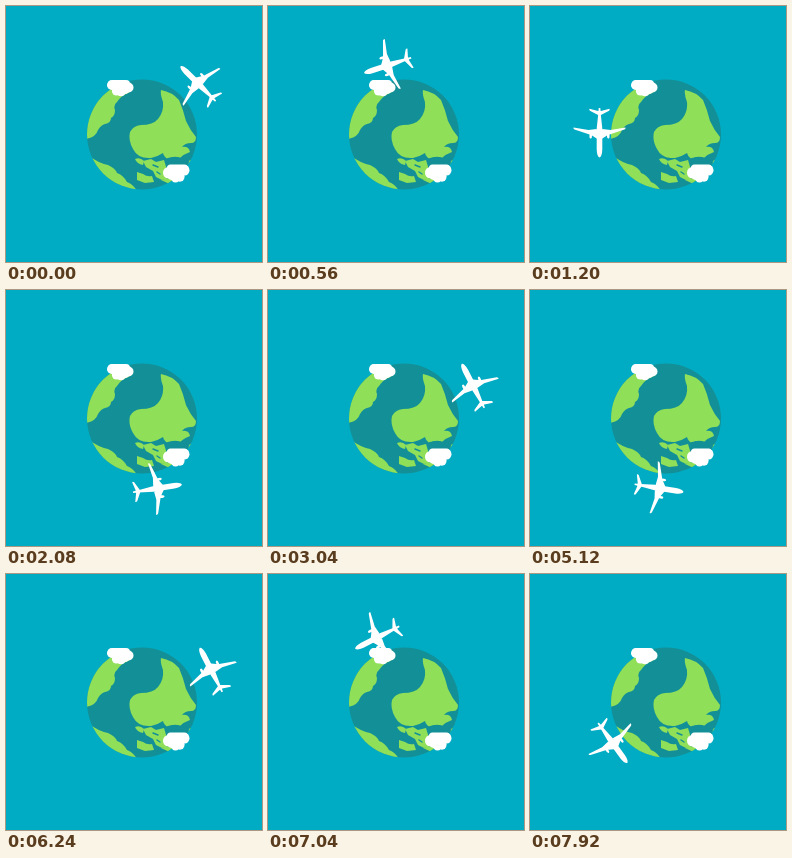
Animation of 256x256 px, one loop 8000 ms. Source, as an HTML page:

```html
<!DOCTYPE html>
<html lang="en">
<head>
<meta charset="utf-8">
<title>Plane around the globe</title>
<style>
  html, body { margin: 0; width: 100%; height: 100%; overflow: hidden; background: #00acc4; }
  svg { display: block; width: 100vw; height: 100vh; }
</style>
</head>
<body>
<svg viewBox="0 0 256 256">
  <defs>
    <clipPath id="disc"><circle cx="136" cy="128.5" r="55"/></clipPath>
    <g id="cloud">
      <rect x="1" y="0" width="22" height="9" rx="4"/>
      <circle cx="4.8" cy="5.2" r="4.8"/>
      <circle cx="21.5" cy="7.5" r="5"/>
      <circle cx="9.5" cy="11" r="4.6"/>
      <circle cx="14" cy="11.5" r="4.8"/>
      <circle cx="18" cy="9.5" r="4.5"/>
    </g>
    <path id="side" d="M0 -6 L2.8 -5 L7.5 -2 Q7.4 -5 8.8 -5 Q10.4 -5 10 -.8 L25 4 Q26.4 4.8 26 6.2 L11 3.6 L2.8 4.6 Z
      M0 18.2 L1.4 18.5 L9.6 22.8 Q10.6 23.8 10 24.8 L1.5 22.6 L0 23 Z"/>
  </defs>
  <rect width="256" height="256" fill="#00acc4"/>
  <g clip-path="url(#disc)">
    <rect x="80" y="72" width="112" height="113" fill="#139097"/>
    <g fill="#8fdf58">
      <path d="M98 78 L127 80 Q126 86 120 88 Q115 90 111 96 Q107 99 109 104 Q109 110 105 112 Q105 117 99 118 Q95 119 92 124 Q90 131 80 133 L78 100 Z"/>
      <path d="M155 84 Q166 86 173 94 Q177 103 180 115 Q184 124 190 131 Q190 137 185 137 Q179 137 176 141 Q183 140 184 146 Q178 148 174 152 Q168 149 162 153 Q158 151 157 147 Q151 151 145 152 Q132 153 127 143 Q122 134 124 126 Q127 120 135 119 Q147 119 152 113 Q158 106 157 96 Q154 88 155 84 Z"/>
      <path d="M82 149 Q92 157 102 159 Q109 162 111 167 Q117 169 121 176 Q127 178 131 185 L105 185 Z"/>
      <path d="M129 153 Q134 151 138 155 L137 159 Q131 158 129 153 Z"/>
      <path d="M137 155 L145 153 L150 156 L158 154 L161 164 L164 172 L156 174 L150 171 L147 165 L140 161 Z"/>
      <path d="M131 166 L137 168 Q141 171 146 170 L148 176 L139 177 L131 174 Z"/>
      <path d="M155 174 Q163 171 173 175 L168 180 Z"/>
      <path d="M183 155 Q187 153 191 146 L191 158 L182 164 Z"/>
    </g>
    <g fill="none" stroke="#139097" stroke-linecap="round">
      <path d="M162 153 Q170 151 175 153 Q180 149 186 151" stroke-width="2.2"/>
      <path d="M147 159 l5 2 M151 166 l3 2" stroke-width="1.4"/>
    </g>
  </g>
  <g fill="#fff">
    <use href="#cloud" x="101" y="74"/>
    <use href="#cloud" transform="translate(183.5 158.5) scale(-1 1.1)"/>
    <g id="plane">
      <path d="M-2.8 -16 Q-2.5 -23 0 -24 Q2.5 -23 2.8 -16 L2.8 5 L1.2 20 L.8 25.5 L-.8 25.5 L-1.2 20 L-2.8 5 Z"/>
      <use href="#side"/>
      <use href="#side" transform="scale(-1 1)"/>
    </g>
  </g>
</svg>
<script>
  const LOOP = 8000, ORBIT = 3200, STEP = 80;
  const plane = document.getElementById("plane");
  const start = performance.now();

  function draw(ms) {
    const t = Math.floor(ms % LOOP / STEP) * STEP;
    const angle = 45 + 360 * t / ORBIT;
    plane.setAttribute("transform",
      `translate(141 127.6) rotate(${-angle}) translate(71.5 0)`);
  }

  function tick(now) {
    draw(Math.max(0, now - start));
    requestAnimationFrame(tick);
  }

  draw(0);
  requestAnimationFrame(tick);
</script>
</body>
</html>
```
